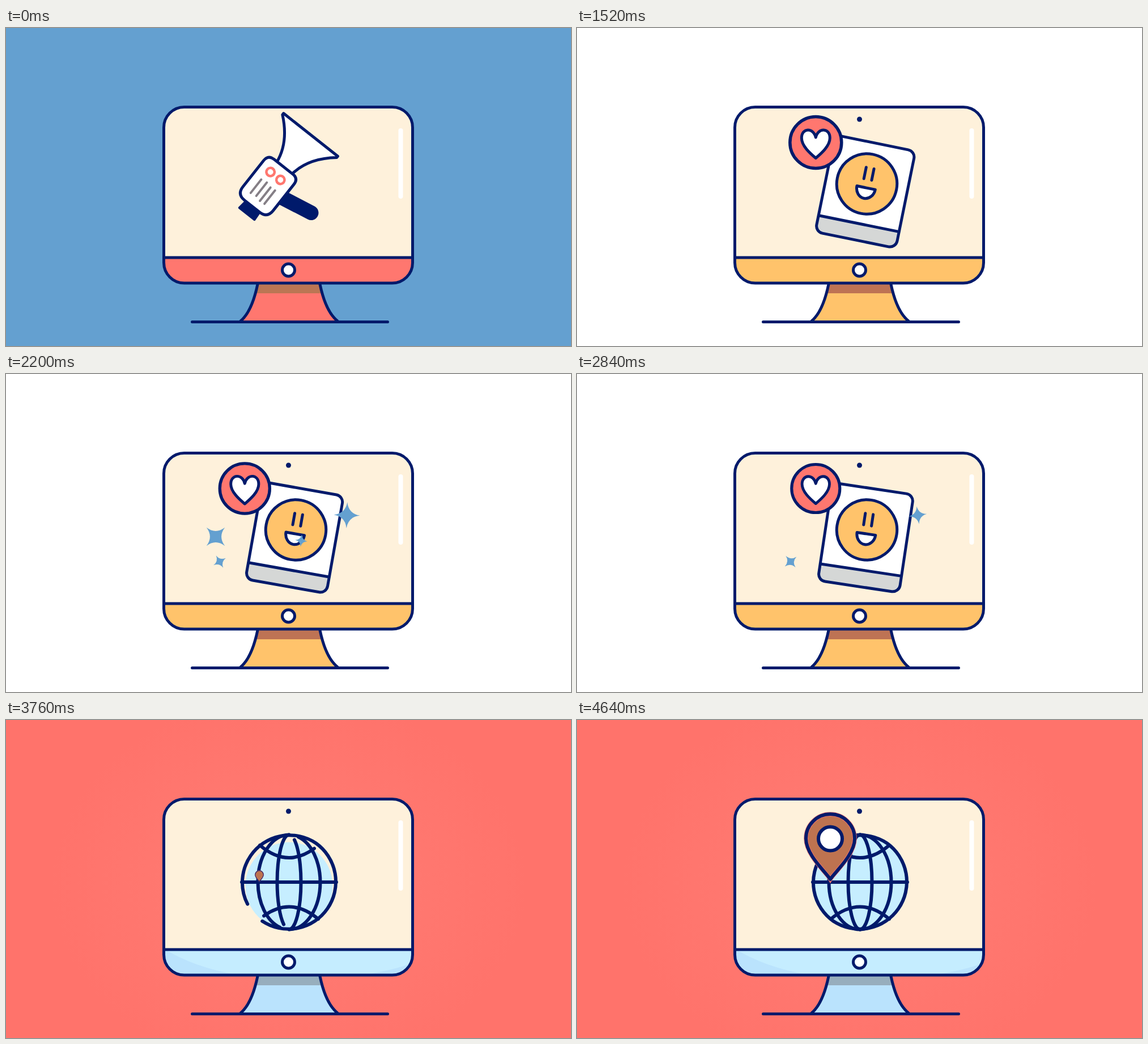
Animation of 997 by 561 pixels, one loop 4.8 s. Source, as an HTML page:

```html
<!DOCTYPE html>
<html lang="en">
<head>
<meta charset="utf-8">
<title>Monitor</title>
<style>
  html, body { margin: 0; width: 100%; height: 100%; overflow: hidden; }
  svg { display: block; width: 100%; height: 100%; }
  .line { fill: none; stroke: #001a6b; stroke-width: 5; stroke-linecap: round; stroke-linejoin: round; }
  .navy { fill: #001a6b; }
  .white { fill: #fff; }
  .coral { fill: #ff776f; }
  .orange { fill: #ffc36b; }
  .thick { stroke-width: 6; }
</style>
</head>
<body>
<svg viewBox="0 0 997 561">
  <defs>
    <clipPath id="case"><rect x="278.5" y="139.5" width="439" height="310.5" rx="36"/></clipPath>
    <radialGradient id="glow" gradientUnits="userSpaceOnUse" cx="499" cy="290" r="420" gradientTransform="translate(0 58) scale(1 .8)">
      <stop offset=".4" stop-color="#ff7971"/><stop offset="1" stop-color="#ff736b"/>
    </radialGradient>
    <path id="star" d="M0-1Q.12-.12 1 0Q.12.12 0 1Q-.12.12-1 0Q-.12-.12 0-1Z"/>
    <path id="pinShape" d="M0-5C-8-18-43-48-43-77A43 43 0 0 1 43-77C43-48 8-18 0-5Z"/>
  </defs>

  <rect id="backdrop" width="997" height="561"/>

  <!-- monitor -->
  <path id="stand" d="M444 450Q434 500 414 517.500H585Q564 500 554 450Z"/>
  <path id="shade" d="M444 450L440 468H558L554 450Z"/>
  <path class="line" d="M444 452Q434 500 414 517M554 452Q564 500 585 517M328.500 518.500H673.500"/>
  <g clip-path="url(#case)">
    <rect x="278" y="139" width="440" height="266" fill="#fef1db"/>
    <rect id="chin" x="278" y="405" width="440" height="46"/>
    <path id="chinShade" fill="#bae3fd" d="M278 403Q330 436 410 450H278ZM718 428Q690 440 630 450H718Z"/>
  </g>
  <rect class="line" x="278.500" y="139.500" width="439" height="310.500" rx="36"/>
  <path class="line" d="M279 405H717"/>
  <circle class="line" cx="498.500" cy="427" r="11" style="fill:#fff"/>
  <circle class="navy" cx="498.500" cy="161" r="4.500"/>
  <path d="M696.500 181V297" stroke="#fff" stroke-width="8" stroke-linecap="round"/>

  <!-- megaphone -->
  <g class="scene">
    <g id="megaphone">
      <path d="M6 30L17.500 90" class="line" style="stroke-width:26"/>
      <path class="line" style="fill:#001a6b;stroke-width:4" d="M-54-15L-38-13V18L-54 19Z"/>
      <path class="line" style="fill:#fff" d="M50-13Q90-18 122-57L125-57V65L122 65Q90 26 50 21Z"/>
      <path class="line" style="fill:#fff" d="M-21-33H38Q51-33 51-20V22Q51 35 38 35H-21Q-38 35-38 18V-16Q-38-33-21-33Z"/>
      <g fill="none" stroke="#ff776f" stroke-width="4.500">
        <circle cx="29.500" cy="-11" r="7.200"/><circle cx="29.500" cy="11.500" r="7.200"/>
      </g>
      <path d="M-21-15.500H9M-19-4.500H11M-22 6H8M-21 15.500H9" stroke="#857f86" stroke-width="4" stroke-linecap="round"/>
    </g>
    <g fill="none" stroke="#ff776f" stroke-linecap="round">
      <g id="nearWaves">
        <path stroke-width="6" d="M593 237A30 30 0 0 1 602 269"/>
        <path stroke-width="9.500" d="M605.500 223.500A46 46 0 0 1 619 273"/>
      </g>
      <g id="farWaves">
        <path stroke-width="11" d="M619 207.500A68 68 0 0 1 638 279"/>
        <path stroke-width="13.500" d="M634.500 194A84 84 0 0 1 658.500 284"/>
      </g>
    </g>
  </g>

  <!-- picture card -->
  <g class="scene">
    <g id="card">
      <rect class="white" x="-72.500" y="-73.500" width="145" height="174.500" rx="13"/>
      <path fill="#d5d7d6" d="M-72.500 71.500H72.500V88Q72.500 101 59.500 101H-59.500Q-72.500 101-72.500 88Z"/>
      <rect class="line" x="-72.500" y="-73.500" width="145" height="174.500" rx="13"/>
      <path class="line" d="M-72 71.500H72"/>
      <circle class="line" r="53.200" style="fill:#ffc36b"/>
      <path class="line" d="M-7-28.500V-8M7-28.500V-8"/>
      <path class="line" style="fill:#fff" d="M-16.500 7H16.500A16.500 19 0 0 1-16.500 7Z"/>
    </g>
    <g transform="translate(421.300 202)">
      <circle id="badge" class="line" r="45.500" style="fill:#ff776f;stroke-width:5.500"/>
      <path id="heart" class="line" style="fill:#fff" d="M0 27.500C-10 19-25 6-25-8C-25-26-4-27 0-9C4-27 25-26 25-8C25 6 10 19 0 27.500Z"/>
    </g>
    <g id="sparkles" fill="#64a0d0"></g>
  </g>

  <!-- globe and pin -->
  <g class="scene">
    <circle id="ocean" cx="499.500" fill="#c6eeff"/>
    <g id="globe" class="line thick">
      <path pathLength="1" d="M452.200 354.800A83.500 83.500 0 0 0 546.800 217.200A83.500 83.500 0 0 0 452.200 354.800"/>
      <path pathLength="1" d="M499.500 202.500A21 83.500 0 0 0 499.500 369.500"/>
      <path pathLength="1" d="M499.500 369.500A21 83.500 0 0 0 499.500 202.500"/>
      <path pathLength="1" d="M499.500 202.500A55 83.500 0 0 0 499.500 369.500"/>
      <path pathLength="1" d="M499.500 369.500A55 83.500 0 0 0 499.500 202.500"/>
      <path pathLength="1" d="M448 221Q499.500 265 551 221"/>
      <path pathLength="1" d="M551 351Q499.500 308 448 351"/>
      <path id="equator" pathLength="1" d="M416 286H583"/>
    </g>
    <g id="pin">
      <use href="#pinShape" fill="#be7350" stroke="#ff776f" stroke-width="7.500"/>
      <use href="#pinShape" class="line thick"/>
      <circle id="hole" class="line thick" r="21" style="fill:#fff"/>
    </g>
  </g>
</svg>

<script>
const LOOP = 4800, STEP = 40, CARD_START = 1520, GLOBE_START = 3120;
const palettes = [
  { backdrop: '#64a0d0', chin: '#ff776f', stand: '#ff776f', shade: '#bb7654' },
  { backdrop: '#fff', chin: '#ffc36b', stand: '#ffc36b', shade: '#be7354' },
  { backdrop: 'url(#glow)', chin: '#c5edff', stand: '#bae3fd', shade: '#97aebd' }
];
// in: grows over 300 ms from here; out: shrinks over 360 ms; tilt: angle at 2200 ms
const sparkles = [
  { x: 601.5, y: 249, r: 23, tilt: 2, in: 1760, out: 2730 },
  { x: 370, y: 287, r: 23, tilt: 45, in: 1640, out: 2470 },
  { x: 521, y: 294, r: 15, tilt: 6, in: 1800, out: 2100 },
  { x: 377, y: 331, r: 15, tilt: -30, in: 1980, out: 2800 }
];

const $ = id => document.getElementById(id);
const scenes = [...document.querySelectorAll('.scene')];
const show = (el, on) => el.style.display = on ? '' : 'none';
const move = (el, value) => el.setAttribute('transform', value);
const part = (t, from, to) => Math.min(1, Math.max(0, (t - from) / (to - from)));
const smooth = p => (1 - Math.cos(Math.PI * p)) / 2;
const easeOut = p => Math.sin(Math.PI * p / 2);
const easeOutBack = p => 1 + 2.70158 * (p - 1) ** 3 + 1.70158 * (p - 1) ** 2;

for (const s of sparkles) {
  s.el = document.createElementNS('http://www.w3.org/2000/svg', 'use');
  s.el.setAttribute('href', '#star');
  $('sparkles').append(s.el);
}

function drawMegaphone(t) {
  const angle = -14.3 - 37.4 * (1 - easeOutBack(part(t, 0, 320)));
  move($('megaphone'), `translate(457 284) rotate(${angle})`);
  show($('nearWaves'), t >= 480);
  show($('farWaves'), t >= 720);
}

function drawCard(t) {
  const swing = Math.cos((t - CARD_START) / 900 * 2 * Math.PI);
  const pulse = 0.967 + 0.033 * swing;
  move($('card'), `translate(511.500 275) rotate(${10 + 1.5 * swing})`);
  move($('badge'), `scale(${pulse})`);
  move($('heart'), `scale(${(1 + pulse) / 2})`);
  for (const s of sparkles) {
    const size = s.r * smooth(part(t, s.in, s.in + 300)) * (1 - part(t, s.out, s.out + 360));
    show(s.el, size > 0);
    move(s.el, `translate(${s.x} ${s.y}) rotate(${s.tilt + (t - 2200) * 0.125}) scale(${size})`);
  }
}

function drawGlobe(t) {
  const drawn = smooth(part(t, GLOBE_START, 3900));
  for (const path of $('globe').children) path.setAttribute('stroke-dasharray', `${drawn} 2`);
  $('equator').setAttribute('stroke-dasharray', `${Math.min(1, drawn * 1.1)} 2`);
  const radius = 83.5 * drawn;
  $('ocean').setAttribute('r', radius);
  $('ocean').setAttribute('cy', 369.5 - radius);

  const size = 1.037 * easeOut(part(t, 3725, 4060)) - 0.037 * smooth(part(t, 4060, 4660));
  show($('pin'), size > 0);
  move($('pin'), `translate(447 286) scale(${size})`);
  const hole = easeOut(part(t, 3800, 4120));
  show($('hole'), hole > 0);
  move($('hole'), `translate(0 -76.500) scale(${hole})`);
}

const painters = [drawMegaphone, drawCard, drawGlobe];
const start = performance.now();

function frame() {
  const t = Math.floor((performance.now() - start) % LOOP / STEP) * STEP;
  const current = t < CARD_START ? 0 : t < GLOBE_START ? 1 : 2;
  scenes.forEach((el, i) => show(el, i === current));
  for (const [id, color] of Object.entries(palettes[current])) $(id).setAttribute('fill', color);
  show($('chinShade'), current === 2);
  painters[current](t);
  requestAnimationFrame(frame);
}
frame();
</script>
</body>
</html>
```
